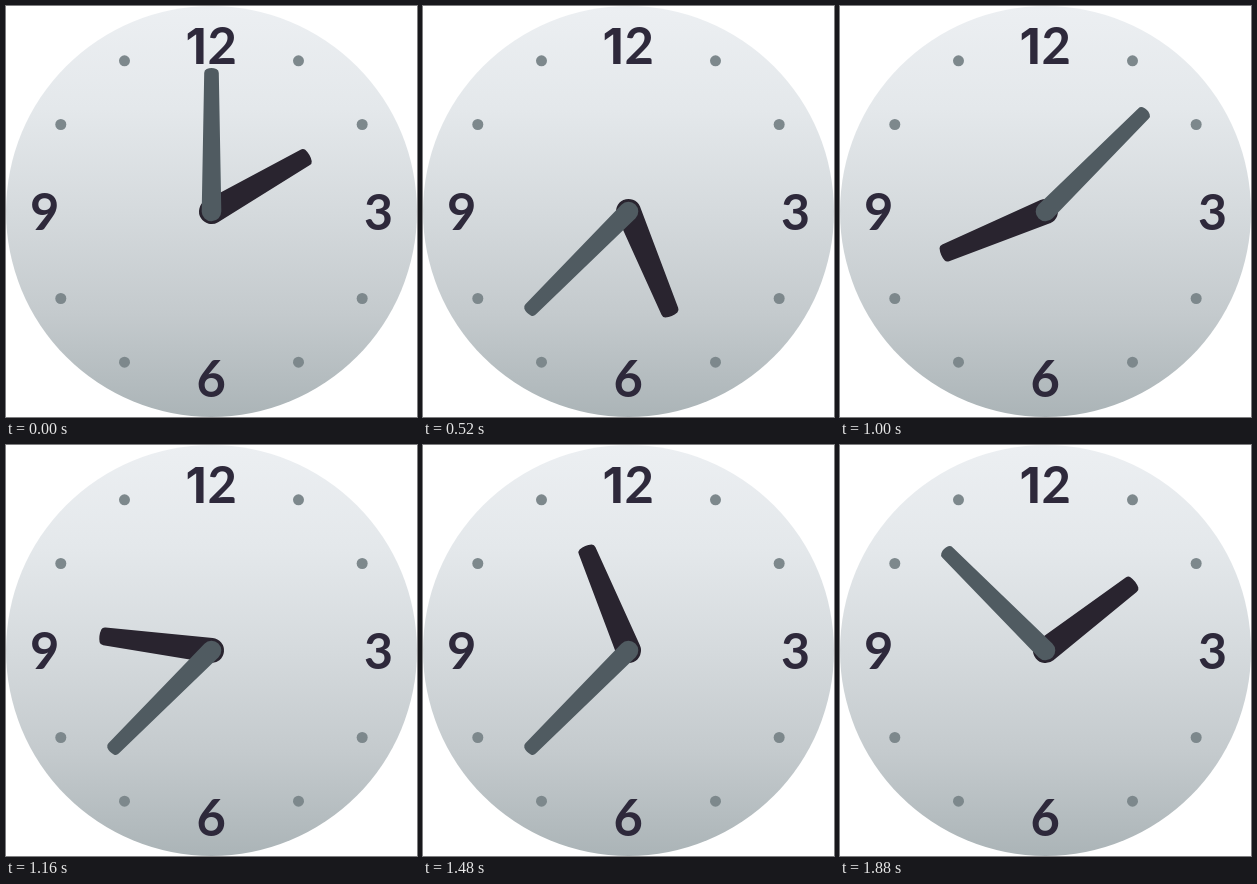
Recreate the animation shown at these times as an HTML page with a canvas. Size 411x411 px, loop 1.92 s.

```html
<!DOCTYPE html>
<html lang="en">
<head>
<meta charset="utf-8">
<title>Clock</title>
<style>
html, body { margin: 0; width: 100%; height: 100%; overflow: hidden; background: #fff; }
canvas { display: block; width: 411px; height: 411px; }
</style>
</head>
<body>
<canvas id="stage" width="411" height="411"></canvas>
<script>
const SIZE = 411, MID = SIZE / 2;
const STEP = 40, STEPS = 48;
const ctx = document.getElementById('stage').getContext('2d');
const rad = deg => deg * Math.PI / 180;

function disc(x, y, r, fill) {
  ctx.fillStyle = fill;
  ctx.beginPath();
  ctx.arc(x, y, r, 0, Math.PI * 2);
  ctx.fill();
}

// Places a numeral by the centre and bottom of its ink.
function numeral(text, font, x, bottom, height) {
  ctx.font = `bold 100px ${font}`;
  const h = ctx.measureText(text);
  const px = 100 * height / (h.actualBoundingBoxAscent + h.actualBoundingBoxDescent);
  ctx.font = `bold ${px}px ${font}`;
  const m = ctx.measureText(text);
  const left = x - (m.actualBoundingBoxRight - m.actualBoundingBoxLeft) / 2;
  ctx.fillText(text, left, bottom - m.actualBoundingBoxDescent);
}

function face() {
  const shade = ctx.createLinearGradient(0, 0, 0, SIZE);
  ['#eceff2', '#e4e8eb', '#d5dadd', '#c4cacd', '#abb4b7']
    .forEach((c, i) => shade.addColorStop(i / 4, c));
  disc(MID, MID, MID, shade);

  for (let h = 1; h < 12; h++) {
    if (h % 3 === 0) continue;
    const a = rad(h * 30);
    disc(MID + 174 * Math.sin(a), MID - 174 * Math.cos(a), 5.5, '#7d888c');
  }

  const round = 'Lato, sans-serif', plain = 'Inter, sans-serif';
  ctx.fillStyle = '#2e293b';
  ctx.textAlign = 'left';
  ctx.textBaseline = 'alphabetic';
  numeral('1', plain, 190, 57.5, 36);
  numeral('2', round, 216, 57.5, 37);
  numeral('3', round, 372, 224, 37);
  numeral('6', round, 205.5, 391, 37);
  numeral('9', round, 38.5, 224, 37);
}

function hand(deg, length, tip, base, fill) {
  const end = -length, a = Math.asin((base - tip) / length);
  ctx.save();
  ctx.translate(MID, MID);
  ctx.rotate(rad(deg));
  ctx.fillStyle = fill;
  ctx.beginPath();
  ctx.arc(0, 0, base, -a, Math.PI + a);
  ctx.lineTo(-tip, end + 5);
  ctx.quadraticCurveTo(-tip, end + 2, 2.5 - tip, end + 1);
  ctx.quadraticCurveTo(0, end - 1, tip - 2.5, end + 1);
  ctx.quadraticCurveTo(tip, end + 2, tip, end + 5);
  ctx.closePath();
  ctx.fill();
  ctx.restore();
}

function draw(ms) {
  const n = Math.floor(ms / STEP) % STEPS;
  ctx.clearRect(0, 0, SIZE, SIZE);
  face();
  hand(60 + n * 7.5, 113, 9, 12.5, '#29242f');
  hand(n * 45, 143.5, 7.3, 9.8, '#505b61');
}

let start = null;
function tick(now) {
  if (start === null) start = now;
  draw(Math.max(0, now - start));
  requestAnimationFrame(tick);
}
draw(0);
requestAnimationFrame(tick);
</script>
</body>
</html>
```
